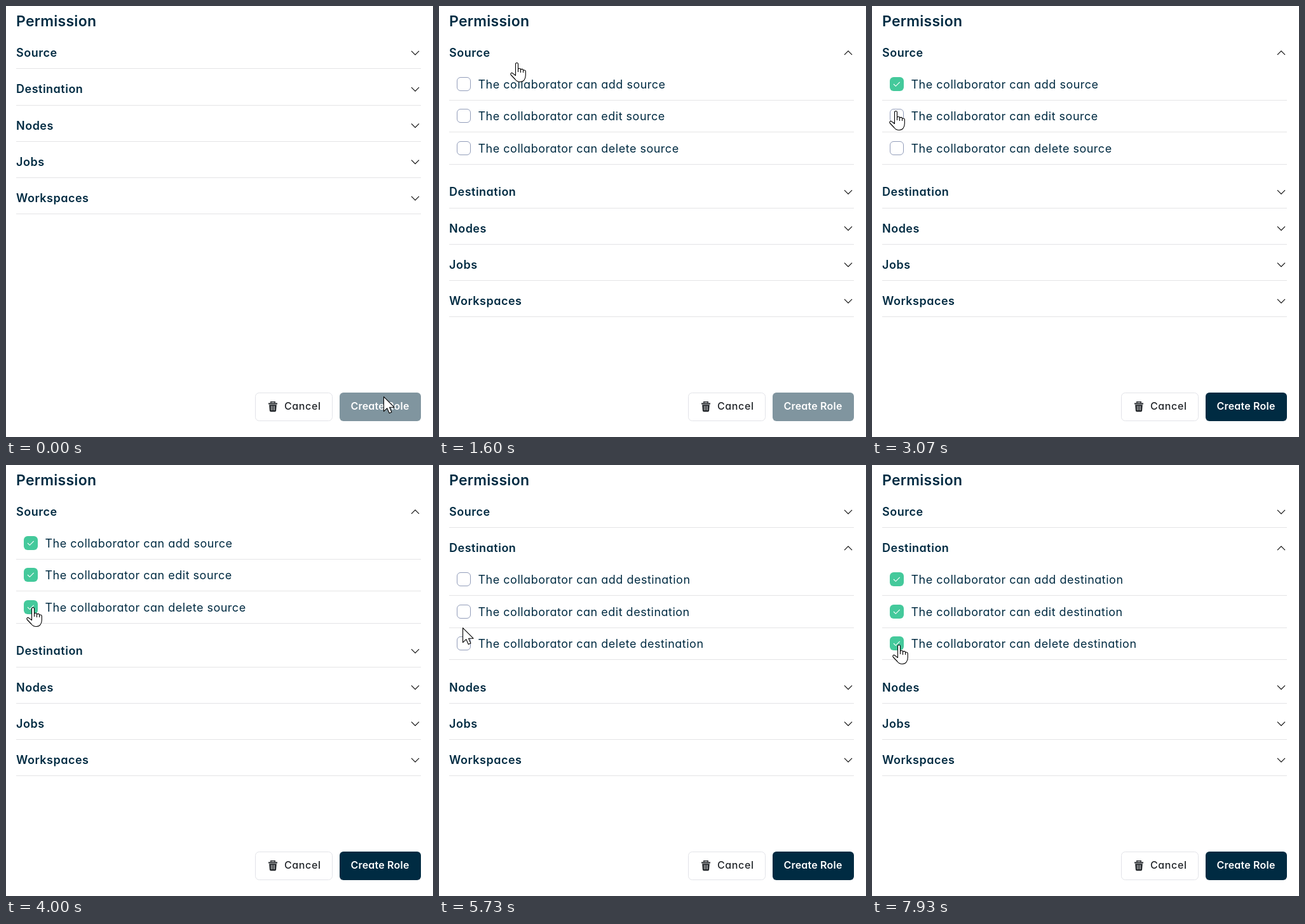
Animation of 672 by 679 pixels, one loop 8000 ms. Source, as an HTML page:

```html
<!DOCTYPE html>
<html lang="en">
<head>
<meta charset="utf-8">
<title>Role permissions</title>
<style>
  html, body { margin: 0; width: 100%; height: 100%; overflow: hidden; background: #fff; }
  #stage { display: block; width: 672px; height: 679px; }
  text {
    font: 400 18px Poppins, Inter, sans-serif;
    font-feature-settings: "cv11";
    letter-spacing: .5px;
    fill: #002b42;
  }
  .title { font-size: 23px; font-weight: 600; letter-spacing: .25px; }
  .head { font-weight: 600; }
  .cancel { font-size: 16px; font-weight: 500; letter-spacing: .6px; fill: #212529; }
  .create { font-size: 16px; font-weight: 600; letter-spacing: .2px; fill: #fff; }
  .line { fill: #e4e4e6; }
  .chevron { fill: none; stroke: #111; stroke-width: 1.2; }
  .cursor { fill: #fff; stroke: #000; stroke-width: 1.1; stroke-linejoin: round; }
</style>
</head>
<body>
<svg id="stage" viewBox="0 0 672 679"></svg>
<script>
const stage = document.getElementById('stage');
const LOOP = 8000, FPS = 15, LAST = LOOP * FPS / 1000 - 1;
const CONTENT = 162, CLICK_DELAY = 133;
const SECTIONS = ['Source', 'Destination', 'Nodes', 'Jobs', 'Workspaces'];
const VERBS = ['add', 'edit', 'delete'];

// Pointer moves: start, end, x, y, and what is clicked on arrival
const START = [594, 615];
const moves = [
  [0, 333, 213, 116],
  [467, 1067, 140, 81, 'Source'],
  [1333, 2267, 42, 119, 'Source add'],
  [2600, 3067, 36, 165, 'Source edit'],
  [3200, 3467, 39, 194],
  [3467, 3867, 41, 224, 'Source delete'],
  [4200, 4400, 47, 244],
  [4667, 5200, 39, 290, 'Destination'],
  [5533, 6067, 33, 183, 'Destination add'],
  [6267, 6733, 39, 227, 'Destination edit'],
  [7133, 7800, 41, 283, 'Destination delete']
];

const clicks = {};
for (const [, end, , , name] of moves) if (name) clicks[name] = end + CLICK_DELAY;

const ARROW = 'M.5.7V23.6L5.8 18.7 9.3 26.4 12.9 24.8 9.6 17.2H17z';
const HAND = 'M8.5 2.5a2 2 0 0 1 4 0V11q0-1.8 2-1.8t2 1.8v1q0-1.6 2-1.6t2 1.8v1' +
  'q0-1.4 1.9-1.2t1.9 2V20c0 6-3 10.5-8.5 10.5-4 0-6-1-8-4L1.2 19.5' +
  'c-1.5-2.3.8-4 3-2.4l4.3 3.4zM12.5 11v4M16.5 12v4M20.5 13v3';

const clamp = v => Math.max(0, Math.min(1, v));
const ease = v => v * v * (3 - 2 * v);
const clicked = (t, name) => t >= clicks[name] - 2;
const slide = (t, name) => name in clicks ? ease(clamp((t - clicks[name] + 67) / 200)) : 0;

function pointer(t) {
  let [x, y] = START;
  for (const [start, end, toX, toY] of moves) {
    const k = ease(clamp((t - start) / (end - start)));
    x += (toX - x) * k;
    y += (toY - y) * k;
  }
  return [x, y];
}

const label = (x, y, cls, str) => `<text x="${x}" y="${y}" class="${cls}">${str}</text>`;
const line = y => `<rect class="line" x="16" y="${y}" width="637" height="1"/>`;

function checkbox(y, on) {
  return on
    ? `<rect x="28" y="${y}" width="22" height="22" rx="6" fill="#44c99b"/>
       <path d="M34 ${y + 11}l3.3 3.3 6.4-6.5" fill="none" stroke="#fff" stroke-width="1.1"/>`
    : `<rect x="28.5" y="${y + .5}" width="21" height="21" rx="5.5" fill="#fff" stroke="#929dba"/>`;
}

function buttons(enabled) {
  return `<rect x="392.5" y="609.5" width="121" height="44" rx="6" fill="#fff" stroke="#e2e3e8"/>
    <path d="M413 625.5h14v2h-14zM414.2 628.3h11.6l-.7 9.2q-.2 1.7-1.9 1.7h-6.4q-1.7 0-1.9-1.7z" fill="#212529"/>
    <path d="M416.8 625.5v-1.7h6.4v1.7" fill="none" stroke="#212529" stroke-width="1.5"/>
    <path d="M417.6 630v7M420 630v7M422.4 630v7" stroke="#fff" stroke-width=".8"/>
    ${label(438, 636, 'cancel', 'Cancel')}
    <rect x="525" y="609" width="128" height="45" rx="6" fill="${enabled ? '#002b42' : '#80959f'}"/>
    ${label(542.5, 636, 'create', 'Create Role')}`;
}

function render(t) {
  const [px, py] = pointer(t);
  const current = SECTIONS.filter(name => clicked(t, name)).pop();
  let out = label(16, 32, 'title', 'Permission');
  let shift = 0, overLink = false;

  SECTIONS.forEach((name, i) => {
    const base = 98.3 + 57.25 * i + shift, y = Math.round(base);
    // Opening a section closes the one before it.
    const amount = slide(t, name) - slide(t, SECTIONS[i + 1]);

    out += label(16, base - 18.3, 'head', name) +
      `<path class="chevron" d="M638 -3l6 6 6-6" transform="translate(0 ${base - 24.5}) ` +
      `rotate(${180 * amount} 644 0)"/>`;
    if (name !== current) out += line(y);
    if (py > y - 49 && py < y) overLink = true;

    if (amount > 0) {
      out += `<svg y="${y + 1}" width="672" height="${CONTENT * amount}"><g transform="translate(0 ${-y - 1})">`;
      VERBS.forEach((verb, row) => {
        const bottom = Math.floor(base + 50.25 * (row + 1)), top = bottom - 36;
        out += checkbox(top, clicked(t, `${name} ${verb}`)) + line(bottom) +
          label(61.5, bottom - 18, '', `The collaborator can ${verb} ${name.toLowerCase()}`);
        if (px > 28 && px < 50 && py >= top && py < top + 22) overLink = true;
      });
      out += '</g></svg>';
    }
    shift += CONTENT * amount;
  });

  out += buttons(clicked(t, 'Source add'));
  const left = Math.round(px) - (overLink ? 9 : 0);
  out += `<path class="cursor" d="${overLink ? HAND : ARROW}" transform="translate(${left} ${Math.round(py)})"/>`;
  stage.innerHTML = out;
}

let shown = -1;
function tick() {
  const step = Math.min(LAST, Math.floor((performance.now() % LOOP + 4) * FPS / 1000));
  if (step !== shown) render((shown = step) * 1000 / FPS);
  requestAnimationFrame(tick);
}
tick();
</script>
</body>
</html>
```
